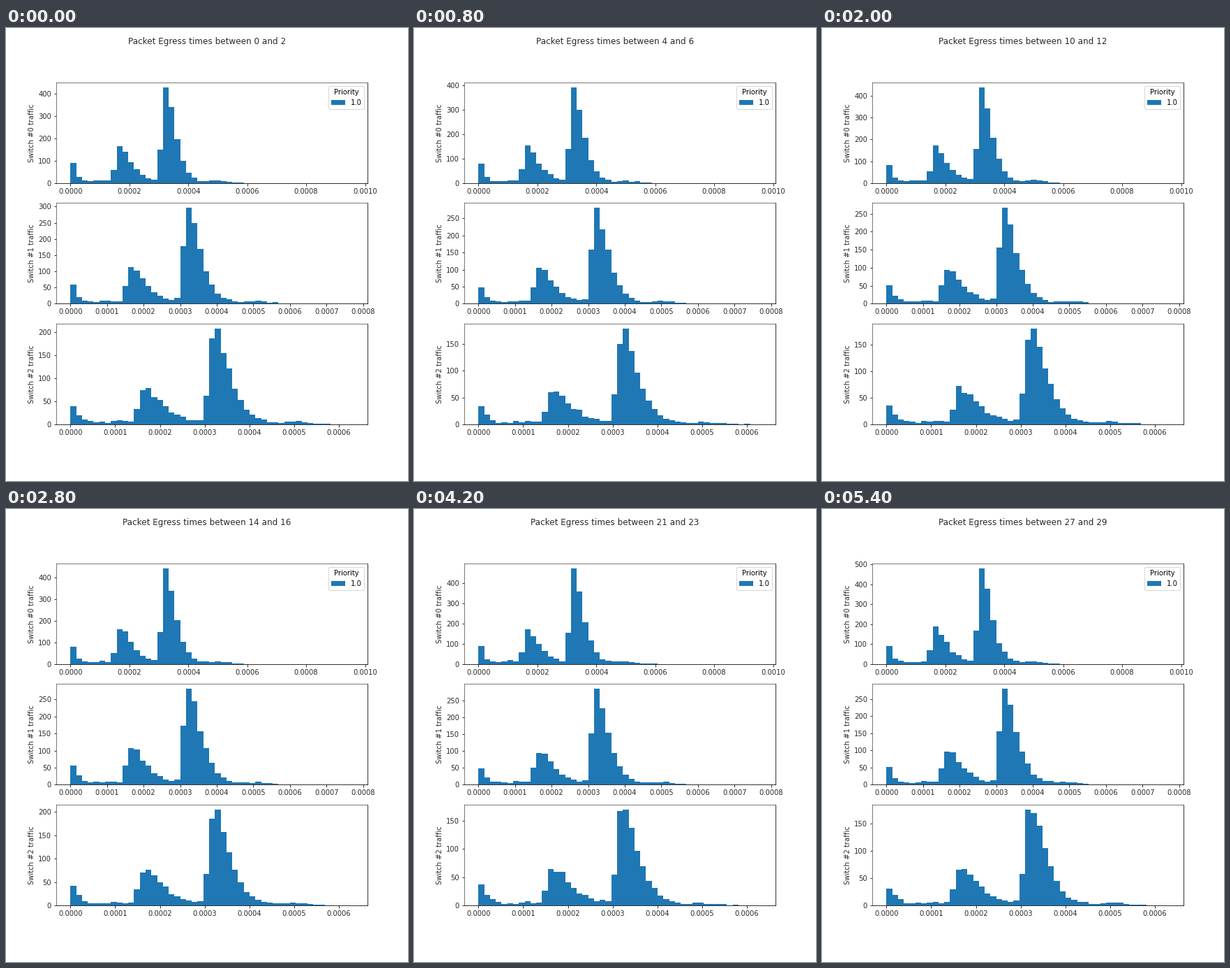
A matplotlib script that plays this animation: 576x648 px, repeating every 5.6 s.

```python
import numpy as np
import matplotlib.pyplot as plt
from matplotlib.animation import FuncAnimation
from matplotlib.ticker import FormatStrFormatter, MultipleLocator

FRAMES, BINS = 28, 49
KEYS = [0, 4, 10, 14, 17, 21, 27]  # windows at which the peak count is given
INK = "#2a2a2a"
rng = np.random.default_rng(7)


def surge(t, onset, spread):
    """Steep rise at onset, then a slower fall; t in microseconds."""
    rise = 1 / (1 + np.exp((onset - t) / 4))
    return rise * np.exp(-(np.maximum(t - onset - 19, 0) / spread) ** 1.4)


def bump(t, centre, width):
    return np.exp(-((t - centre) / width) ** 2)


def profile(t):
    """Relative traffic at delay t; the same shape holds for all switches."""
    return (0.4 * np.exp(-t / 13) + 0.36 * surge(t, 150.5, 52) + surge(t, 307, 43)
            + 0.018 * np.exp(-(t / 450) ** 4)
            + 0.015 * bump(t, 108, 20) + 0.022 * bump(t, 505, 45))


def counts(span, peaks):
    """Bar heights per window; neighbouring windows share one time slot."""
    t = (np.arange(BINS) + 0.5) * span / BINS * 1e6
    shape = profile(t)
    shape[0] *= 0.19 / shape[0]
    peak = np.interp(np.arange(FRAMES), KEYS, peaks)[:, None]
    mean = peak * shape / shape.max()
    slots = rng.normal(size=(FRAMES + 1, BINS))
    noisy = mean + 0.3 * (slots[1:] + slots[:-1]) * np.sqrt(mean)
    noisy *= peak / noisy.max(axis=1, keepdims=True)
    return np.maximum(np.round(noisy), 0)


# longest delay, x tick step, y tick step, peak counts
switches = [
    (0.000961, 2e-4, 100, [430, 392, 440, 442, 470, 474, 482]),
    (0.000774, 1e-4, 50, [296, 281, 266, 281, 292, 284, 279]),
    (0.000633, 1e-4, 50, [208, 178, 181, 205, 171, 170, 175]),
]

plt.rcParams.update({"font.family": "DejaVu Sans", "axes.labelcolor": INK,
                     "xtick.labelcolor": INK, "ytick.labelcolor": INK})
fig, axes = plt.subplots(3, 1, figsize=(8, 9), dpi=72)
fig.subplots_adjust(left=0.125, right=0.9, bottom=0.125, top=0.88, hspace=0.2)
title = fig.suptitle("", fontsize=12, y=0.98, color=INK)

data, bars = [], []
for k, (ax, (span, xstep, ystep, peaks)) in enumerate(zip(axes, switches)):
    data.append(counts(span, peaks))
    edges = np.linspace(0, span, BINS + 1)
    bars.append(ax.bar(edges[:-1], data[k][0], width=span / BINS, align="edge",
                       color="#1f77b4", label="1.0"))
    ax.set_xlim(-0.05 * span, 1.05 * span)
    ax.set_xticks(np.arange(0, 1.05 * span, xstep))
    ax.xaxis.set_major_formatter(FormatStrFormatter("%.4f"))
    ax.yaxis.set_major_locator(MultipleLocator(ystep))
    ax.set_ylabel(f"Switch #{k} traffic")
    ax.spines[["top", "left"]].set_color("0.35")
axes[0].legend(title="Priority", loc="upper right")


def update(i):
    title.set_text(f"Packet Egress times between {i} and {i + 2}")
    for ax, group, heights in zip(axes, bars, data):
        for bar, h in zip(group, heights[i]):
            bar.set_height(h)
        ax.set_ylim(0, 1.05 * heights[i].max())


anim = FuncAnimation(fig, update, frames=FRAMES, interval=200, repeat=True,
                     repeat_delay=0)
plt.show()
```
